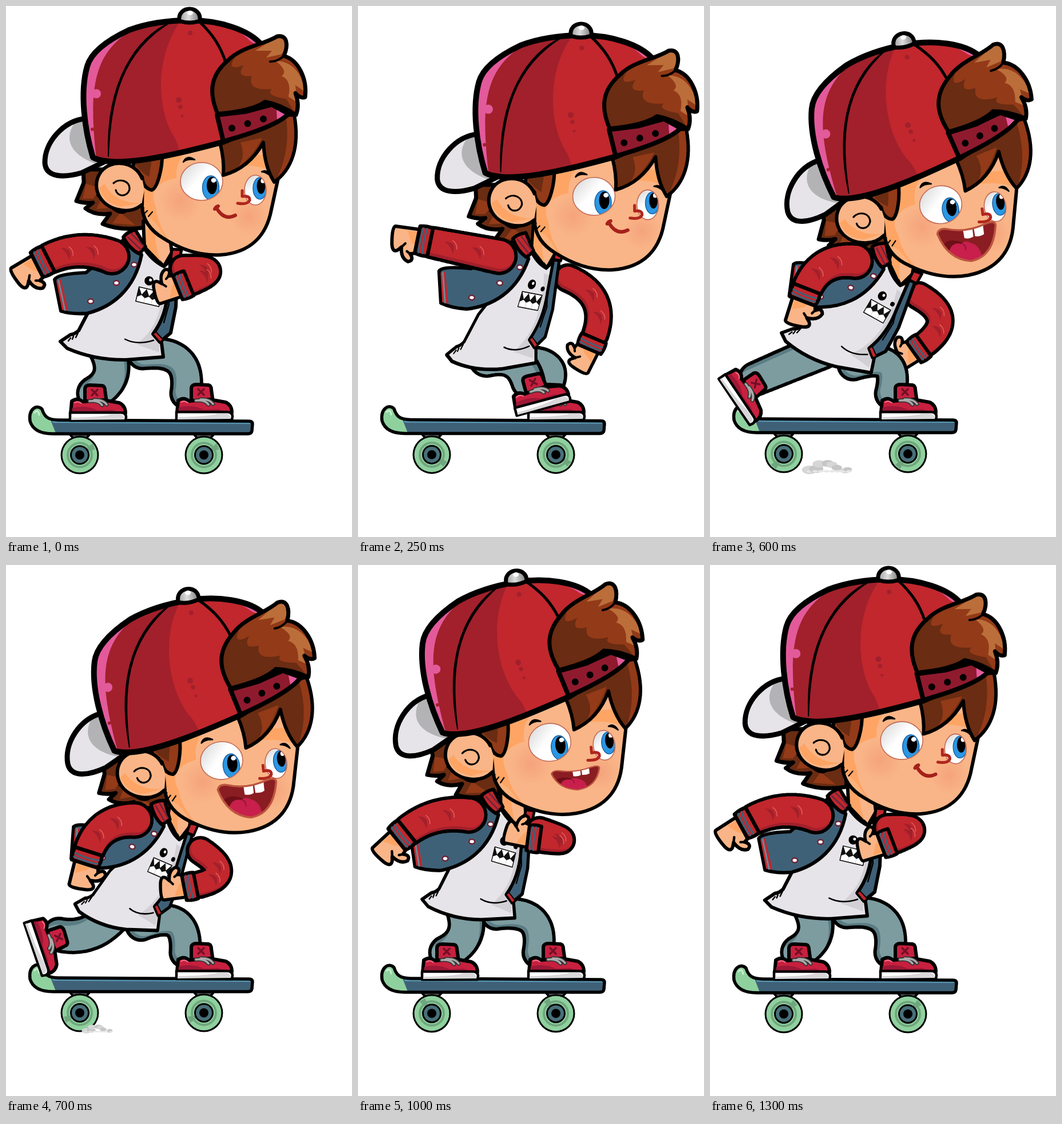
Animation, 605 px wide and 926 px high, one loop 1.35 s. Source, as an HTML page with a canvas:

```html
<!DOCTYPE html>
<html lang="en">
<head>
<meta charset="utf-8">
<title>Skateboard push</title>
<style>
html, body { margin: 0; width: 100%; height: 100%; overflow: hidden; background: #fff; }
canvas { display: block; }
</style>
</head>
<body>
<canvas id="stage" width="605" height="926"></canvas>
<script>
const g = document.getElementById('stage').getContext('2d');
const LOOP = 1350, STEP = 50, KEYS = [0, 250, 450, 600, 800, 1000];
const RED = '#c1272d', DARKRED = '#a1202b', PINK = '#e35a9b', SLATE = '#3f6178', SKIN = '#f9b587',
  SHADE = '#fea565', HAIR = '#933a18', DARKHAIR = '#6a2c12', GOLD = '#bb6e3a', SHIRT = '#e6e4e8',
  DENIM = '#7d9ca0', DARKDENIM = '#5b7c83', MINT = '#8fd19e', SHOE = '#c8203f', DARKSHOE = '#9c1836';

// Periodic monotone cubic through one pose per key time.
function track(...poses) {
  const n = KEYS.length;
  const gap = i => (KEYS[(i + 1) % n] - KEYS[i] + LOOP) % LOOP;
  const slope = (i, c) => (poses[(i + 1) % n][c] - poses[i][c]) / gap(i);
  const tangent = (i, c) => {
    const a = slope((i + n - 1) % n, c), b = slope(i, c);
    return a * b <= 0 ? 0 : 2 * a * b / (a + b);
  };
  return t => {
    const i = KEYS.findLastIndex(k => k <= t), j = (i + 1) % n, h = gap(i), u = (t - KEYS[i]) / h, v = 1 - u;
    return poses[i].map((p, c) => p * v * v * (1 + 2 * u) + poses[j][c] * u * u * (3 - 2 * u)
      + h * u * v * (v * tangent(i, c) - u * tangent(j, c)));
  };
}

// Only these points are posed; every joint between them is derived.
const headPose = track([320, 17, 0], [389, 43, -.3], [373, 73, -6], [337, 60, -8.7], [300, 47, -6.2], [275, 22, -7.5]);
const collarPose = track([223, 408, 0], [288, 413, 8], [322, 442, 21], [299, 430, 19], [245, 424, 11], [233, 409, 3]);
const hemPose = track([95, 585], [155, 608], [137, 600], [125, 570], [117, 612], [112, 583]);
const footPose = track([160, 723, 0], [324, 702, -15], [195, 823, 0], [42, 690, 56], [60, 662, 78], [160, 723, 0]);
const nearWrist = track([70, 443], [122, 411], [160, 447], [168, 497], [109, 506], [82, 467]);
const farWrist = track([316, 485], [411, 583], [404, 624], [370, 594], [300, 524], [314, 478]);

const clamp = x => Math.min(1, Math.max(0, x));
const lerp = (a, b, u) => a.map((p, i) => p + (b[i] - p) * u);
const mouthOpen = t => clamp((t - 290) / 150) * clamp((1240 - t) / 400);

// Point at offset (x, y) from a turned origin
function offset([ox, oy, deg], x, y) {
  const a = deg * Math.PI / 180, c = Math.cos(a), s = Math.sin(a);
  return [ox + x * c - y * s, oy + x * s + y * c];
}
// Bends a two-bone chain towards one side
function chain([x0, y0], [x2, y2], length, side) {
  const dx = x2 - x0, dy = y2 - y0, d = Math.hypot(dx, dy) || 1;
  const bend = side * Math.sqrt(Math.max(0, length * length - d * d)) / 2 / d;
  return [x0, y0, (x0 + x2) / 2 + dy * bend, (y0 + y2) / 2 - dx * bend, x2, y2];
}

function ink(d, fill, width = 6, line = '#000') {
  const p = new Path2D(d);
  if (fill) { g.fillStyle = fill; g.fill(p); }
  if (width) { g.strokeStyle = line; g.lineWidth = width; g.stroke(p); }
}
function oval(x, y, rx, ry, fill, width = 0, line = '#000') {
  g.beginPath();
  g.ellipse(x, y, rx, ry, 0, 0, 7);
  g.fillStyle = fill;
  g.fill();
  if (width) { g.strokeStyle = line; g.lineWidth = width; g.stroke(); }
}
const dot = (x, y, r, fill = '#000') => oval(x, y, r, r, fill);
function group(draw) { g.save(); draw(); g.restore(); }
function within(d, draw) { group(() => { g.clip(new Path2D(d)); draw(); }); }
function place([x, y, deg], px = 0, py = 0) {
  g.translate(x, y);
  g.rotate(deg * Math.PI / 180);
  g.translate(-px, -py);
}
// Affine map that takes the upright torso to collar, back hem and front hem
function warpTorso(collar, back, front) {
  const a = -128, b = 177, c = 52, e = 204, k = a * e - b * c;
  const [x, y] = [0, 1].map(i => {
    const p = back[i] - collar[i], q = front[i] - collar[i];
    return [(p * e - q * b) / k, (q * a - p * c) / k, collar[i]];
  });
  g.transform(x[0], y[0], x[1], y[1], x[2], y[2]);
  g.translate(-223, -408);
}

// Tapered tube along a quadratic curve
function limb([x0, y0, x1, y1, x2, y2], w0, w1, fill, shade, dx, dy, folds = []) {
  const at = u => {
    const v = 1 - u;
    return [v * v * x0 + 2 * u * v * x1 + u * u * x2, v * v * y0 + 2 * u * v * y1 + u * u * y2];
  };
  const p = new Path2D();
  for (let i = 0; i <= 32; i++) {
    const u = i / 32 * .93, [x, y] = at(u), r = (w0 + (w1 - w0) * u) / 2;
    p.moveTo(x + r, y);
    p.arc(x, y, r, 0, 2 * Math.PI);
  }
  group(() => {
    g.lineWidth = 12;
    g.strokeStyle = '#000';
    g.stroke(p);
    g.fillStyle = shade;
    g.fill(p);
    g.clip(p);
    g.translate(dx, dy);
    g.fillStyle = fill;
    g.fill(p);
  });
  for (const u of folds) group(() => {
    g.translate(...at(u));
    ink('M-10-8Q12-8 4 13Q2 0-10-8Z', DARKRED, 0);
    ink('M4-10Q12-4 11 5', null, 1.5, '#e2615f');
  });
}

function hand([, , x1, y1, x2, y2], size, flip) {
  group(() => {
    g.translate(x2, y2);
    g.rotate(Math.atan2(y2 - y1, x2 - x1));
    g.scale(size, size * flip);
    ink('M12-17L56-14Q62-12 56 16Q52 30 44 22L40 17Q38 35 25 38Q15 34 24 25L12 21Z', SKIN, 5.5);
    ink('M18-12L36-11L26 6L18 12Z', SHADE, 0);
    ink('M40 17L35 10M24 25L30 22', null, 4);
    ink('M-4-23Q6-25 17-22L17 22Q6 25-4 23Z', RED, 6);
    ink('M5-20Q8 0 5 20M11-20Q14 0 11 20', null, 3, SLATE);
  });
}

function shoe(pose) {
  group(() => {
    place(pose);
    ink('M-22-34L-22-56Q-21-62-13-62L8-61Q13-60 13-53L16-32Z', SHOE);
    ink('M-10-54L0-44M0-54L-10-44', null, 3.5, '#701027');
    ink('M-47-13L-45-34Q-35-41-26-33L10-36L38-31Q49-26 49-13Z', SHOE);
    ink('M-45-14L-44-22Q-20-28 0-18L25-19L40-14Z', DARKSHOE, 0);
    ink('M-40-31Q-34-35-28-30', null, 2, '#f0708a');
    const laces = 'M-14-34Q2-36 8-27M-6-36Q10-37 16-28';
    ink(laces, null, 7, '#333');
    ink(laces, null, 3.5, '#aaa');
    ink('M-48-14H40Q50-14 50-6L49 0H-48Z', '#fff', 4.5);
    ink('M-46-1V-5Q10-6 24-11H40Q47-9 47-2Z', '#d9d7da', 0);
  });
}

function wheel(x, t) {
  ink(`M${x - 19} 745L${x - 8} 758H${x + 8}L${x + 19} 745Z`, '#555b5e', 4);
  group(() => {
    g.translate(x, 783);
    dot(0, 0, 33.5);
    dot(0, 0, 30.5, MINT);
    oval(0, 0, 21, 21, MINT, 4, '#70a67f');
    group(() => {
      g.rotate(t / LOOP * 2 * Math.PI);
      ink('M12-12L22-20L27-10L14-6Z', '#70a67f', 0);
    });
    dot(0, 0, 17);
    dot(0, 0, 14, '#48707a');
    dot(0, 0, 8);
  });
}

function board(t) {
  group(() => {
    g.translate(0, Math.cos(t / LOOP * 2 * Math.PI) - 1);
    wheel(129, t);
    wheel(346, t);
    const deck = 'M42 724C39 702 54 694 63 703C67 716 73 722 92 722L425 724Q431 724 431 729L430 741Q429 746 423 746L85 746Q49 747 42 724Z';
    ink(deck, SLATE, 0);
    within(deck, () => {
      ink('M35 690H66Q70 722 78 722L89 750H35Z', MINT, 0);
      ink('M84 724L425 726', null, 6, '#5796b2');
    });
    ink('M50 709Q56 702 58 713', null, 3, '#c9f0cf');
    ink(deck, null, 5.5);
  });
}

function print() {
  place([250, 507, 13]);
  ink('M-21-13H21V13H-21Z', '#111', 1);
  for (let x = -20; x < 20; x += 40 / 3) {
    ink(`M${x}-12l6.6 11l6.7-11Z`, '#fff', 0);
    ink(`M${x} 12v-8l6.6-4l6.7 4v8Z`, '#fff', 0);
  }
  dot(-6, -27, 8);
  dot(-4, -29, 2.5, '#fff');
  dot(18, -23, 4);
}

function torso() {
  ink('M240 375L242 420L276 454L290 430L285 390Z', SKIN);
  ink('M244 390L246 420L270 445Q258 410 262 390Z', SHADE, 0);
  ink('M235 424L150 522L127 566Q119 573 113 573L95 585L107 597Q155 618 210 617L275 612L271 580L300 450L288 444L276 454Q255 444 240 420Z', SHIRT);
  ink('M272 462Q282 550 228 590L268 604L268 580L290 470Z', '#d2d0d4', 0);
  ink('M208 581Q230 592 258 583M109 584L113 579M116 581L118 576M122 578L126 570', null, 2.5);
  group(print);
  ink('M289 432L300 434L297 525L288 570L269 586L257 572Q281 540 283 495Z', SLATE);
  ink('M262 568L275 582L269 586L257 572Z', RED, 2);
  ink('M283 495L285 520L276 552', null, 2.5);
  ink('M290 424L307 425L303 444L288 441Z', RED, 5);
}

function flap() {
  ink('M226 412L237 434C225 495 185 525 142 536Q115 538 96 532L85 477Q90 467 140 465L205 408Z', SLATE);
  ink('M88 480L96 476L109 531L98 530Z', RED, 0);
  ink('M92 479L103 530', null, 3, '#6d8798');
  for (let i = 0; i < 3; i++) oval(224 - 24 * i - 7 * i * i, 451 + 32 * i, 5, 4, '#fff', 2.5, '#6d2435');
}

function collar() {
  ink('M205 403Q212 394 226 390L244 420L233 432Q216 424 205 403Z', RED);
  ink('M213 403L236 425M219 397L240 418', null, 2.5, '#64283c');
}

function backHair() {
  ink('M135 285L136 308L123 340Q138 345 152 343L139 353Q156 366 182 362L169 380Q200 393 245 386V285Z', DARKHAIR, 7);
  ink('M140 310L134 336L152 336L166 318ZM165 340L158 354L188 352L192 340ZM200 360L186 379L226 382Z', HAIR, 0);
  ink('M160 330Q170 340 176 335M185 352Q200 365 210 358', null, 4);
}

function eye(x, y, rx, ry, ix, iy, irx, iry) {
  const white = `M${x - rx} ${y}a${rx} ${ry} 0 1 0 ${2 * rx} 0a${rx} ${ry} 0 1 0 ${-2 * rx} 0`;
  const tone = g.createLinearGradient(x - rx, y - ry, x + rx / 2, y + ry / 2);
  tone.addColorStop(0, '#d2d2d4');
  tone.addColorStop(.6, '#fff');
  ink(white, tone, 0);
  within(white, () => {
    oval(ix, iy, irx, iry, '#2b97e3', 1.5, '#1b62a5');
    oval(ix + 2, iy - 4, irx * .62, iry * .72, '#000');
    oval(ix + 5, iy - 13, irx * .3, 4, '#fff');
  });
  ink(white, null, 1.6, '#c26a55');
}

function blush(x, y, r) {
  const tone = g.createRadialGradient(x, y, 0, x, y, r);
  tone.addColorStop(0, 'rgba(238,130,105,.35)');
  tone.addColorStop(1, 'rgba(238,130,105,0)');
  dot(x, y, r, tone);
}

function mouth(open) {
  if (open < .25) {
    ink('M365 354Q367 350 371 349M368 352Q381 375 401 365', null, 6, '#a5211b');
    return;
  }
  g.translate(381, 369 + 6 * open);
  g.scale(.55 + .45 * open, open);
  const lips = 'M-51-19Q-48-29-35-26Q0-14 36-27Q52-31 52-22Q42 32 2 35Q-38 28-51-19Z';
  ink(lips, '#8a1d22', 0);
  within(lips, () => {
    ink('M-42 0Q-28-14 10 12L30 40H-30Z', '#6f0f17', 0);
    ink('M-38 26Q-32-4-12 3Q-4-3 6 4Q22 10 22 36H-20Z', '#c81f4c', 0);
    ink('M-10 3Q-4 6-5 14', null, 2, '#8d1538');
    ink('M-6-28L-5-6Q4-3 11-7L11-28ZM13-28L14-7Q23-5 30-9L30-30Z', '#fff', 0);
  });
  ink(lips, null, 3.5, '#bd553f');
}

function face(t) {
  const head = 'M240 240L238 350Q240 384 275 405Q325 437 375 434C430 430 456 398 464 355L476 300L492 215L340 200Z';
  ink(head, SKIN, 0);
  within(head, () => {
    ink('M230 240H330Q295 265 298 300Q245 310 262 350Q265 390 300 425L230 400Z', SHADE, 0);
    ink('M230 360Q262 365 282 415L230 400Z', '#fcb27c', 0);
    ink('M385 260H500V320Q475 270 385 280Z', SHADE, 0);
    blush(305, 340, 38);
    blush(425, 367, 34);
  });
  ink(head, null, 6);
  ink('M225 266L273 256C274 285 264 318 255 321Q240 318 238 298L222 282Z', HAIR);
  ink('M226 268L256 262L250 298Q236 290 226 276Z', DARKHAIR, 0);
  const ear = 'M238 301C226 270 184 266 166 289C148 314 162 347 196 355Q220 361 237 347';
  ink(ear + 'L242 320Z', SKIN, 0);
  ink('M163 317Q170 343 200 350L236 344Q190 344 172 310Z', SHADE, 0);
  ink(ear, null, 6);
  ink('M188 309C198 300 217 304 216 320C211 335 194 332 192 321', null, 3.2);
  ink('M237 356L241 352M241 363L247 357M249 367L256 359', null, 2.2);
  eye(342, 306, 37, 33, 358, 317, 14.5, 21);
  eye(436, 321, 19, 26, 444, 318, 12, 19);
  ink('M310 272Q316 259 330 268Q317 266 310 272ZM447 289Q457 284 463 297Q456 290 447 289Z', '#000', 2.5);
  ink('M413 322V332Q427 330 426 339Q422 347 405 344', null, 5, '#b0261e');
  group(() => mouth(mouthOpen(t)));
}

function visor() {
  const brim = 'M140 196C100 200 67 238 68 274C70 299 100 300 132 291L180 268Z';
  ink(brim, SHIRT, 0);
  within(brim, () => ink('M128 195C98 225 106 260 165 278L190 230Z', '#b3b3b5', 0));
  ink(brim, null, 9);
}

function cap() {
  const fringe = 'M374 238Q382 268 380 295Q425 283 450 238Q452 280 469 307C500 285 514 245 504 190L470 190Z';
  ink(fringe, DARKHAIR, 0);
  within(fringe, () => ink('M410 238L448 230Q430 265 405 281Q420 265 410 238ZM490 195L515 190L505 280L468 310Q498 260 490 195Z', HAIR, 0));
  ink(fringe, null, 6);

  const crown = 'M152 264C137 215 129 150 142 105C150 77 185 56 215 42C250 29 290 25 322 25C372 25 425 41 447 68L480 110V195L380 237C320 253 230 276 180 271Q160 269 152 264Z';
  ink(crown, DARKRED, 0);
  within(crown, () => {
    ink('M310 20C262 80 262 170 290 222Q300 235 305 262H520V20Z', RED, 0);
    ink('M125 270V100L215 30L245 28C160 70 140 120 159 275Z', PINK, 0);
    ink('M360 20H460V80L428 62Q405 38 360 27Z', PINK, 0);
    dot(158, 153, 8, PINK);
    dot(151, 215, 3, DARKRED);
    dot(322, 47, 4, DARKRED);
    for (let i = 0; i < 3; i++) dot(302 + 3 * i, 164 + 10 * i + 2 * i * i, 5 - 1.3 * i, DARKRED);
    ink('M290 27C228 55 175 130 179 262C183 165 200 80 290 27Z', '#000', 2);
    ink('M338 27C362 50 375 70 384 98', null, 5);
  });
  ink(crown, null, 10);

  const strap = 'M369 190L420 184Q448 176 465 172L494 188Q472 211 380 236Z';
  ink(strap, '#8f1a2e', 0);
  ink('M473 180L492 188L474 200Z', PINK, 0);
  ink(strap, null, 8);
  for (let i = 0; i < 3; i++) dot(395 + 27.5 * i, 213 - 8 * i, 6);

  const tuft = 'M370 188C355 152 356 122 388 95C413 70 450 68 474 53C492 49 494 68 486 87C511 94 527 126 523 159Q515 162 506 152Q514 172 507 190Q480 172 453 167Q430 183 370 188Z';
  ink(tuft, HAIR, 0);
  within(tuft, () => {
    ink('M350 200V120L400 90Q384 115 416 103Q400 125 430 122Q420 148 465 145Q452 156 490 162L510 195Z', DARKHAIR, 0);
    ink('M436 78L480 50L494 65L482 84L455 90L465 78ZM472 96Q512 96 524 150L506 138L509 168L494 158Q500 130 482 122Q494 114 472 96Z', GOLD, 0);
  });
  ink(tuft, null, 7);
  ink('M486 87Q475 97 462 97', null, 4);

  const steel = g.createLinearGradient(302, 0, 340, 0);
  steel.addColorStop(0, '#999');
  steel.addColorStop(.45, '#ddd');
  steel.addColorStop(1, '#777');
  ink('M303 26C299-2 343-2 339 26Q321 32 303 26Z', steel, 7);
  oval(322, 12, 5, 4, '#fff');
}

// A cloud that drifts back and shrinks
function dust(t) {
  const age = (t - 450) / 350, size = age < 0 ? .5 : 1 - .95 * age * age;
  if (t < 400 || age > 1) return;
  group(() => {
    g.translate(270 - 155 * age, 805 + 12 * age * age);
    g.scale(size, size);
    for (let i = 0; i < 8; i++) {
      const x = -36 + 12 * i, lift = Math.sin(i * 2.4);
      oval(x + 8 * age * lift, 3 + 2 * lift - 16 * Math.exp(-((i - 3) ** 2) / 3), 16 - i, 9 - i * .6, i % 2 ? '#c6c6c6' : '#d6d6d6');
      oval(x, 5, 6, 2.5, '#e6e6e6');
    }
  });
}

function draw(t) {
  g.clearRect(0, 0, 605, 926);
  g.lineJoin = g.lineCap = 'round';
  const [hx, hy, tilt] = headPose(t), ear = offset([hx, hy, tilt], -116, 301);
  const neck = collarPose(t), back = hemPose(t), front = offset(neck, 52, 204), foot = footPose(t);
  const near = chain(offset(neck, -38, 29), nearWrist(t), 126, -1);
  const far = chain(offset(neck, 87, 50), farWrist(t), 165, 1);
  const inCap = f => group(() => { place([hx, hy, tilt * 1.2], 320, 17); f(); });
  const inFace = f => group(() => { place([...ear, tilt * .8], 204, 318); f(t); });
  const inJacket = f => group(() => { place(neck, 223, 408); f(); });
  const reach = () => {
    limb(far, 40, 38, RED, DARKRED, 3, -4, [.35, .7]);
    hand(far, 1, 1);
  };
  const inFront = t < 100 || t >= 700, behindLeg = t >= 500 && t < 700;

  board(t);
  inFace(backHair);
  inCap(visor);
  if (behindLeg) reach();
  limb(chain(lerp(back, front, .8), [312, 688], 190, 1), 46, 46, DENIM, DARKDENIM, 5, -4);
  shoe([346, 722, 0]);
  limb(chain(lerp(back, front, .45), offset(foot, -14, -44), 125, 1), 56, 50, DENIM, DARKDENIM, -4, 8);
  shoe(foot);
  dust(t);
  if (!inFront && !behindLeg) reach();
  group(() => { warpTorso(neck, back, front); torso(); });
  inJacket(flap);
  limb(near, 54, 46, RED, DARKRED, 2, -5, [.3, .68]);
  hand(near, 1.08, -1);
  inJacket(collar);
  if (inFront) reach();
  inFace(face);
  inCap(cap);
}

function tick() {
  draw(Math.floor(performance.now() % LOOP / STEP) * STEP);
  requestAnimationFrame(tick);
}
tick();
</script>
</body>
</html>
```
